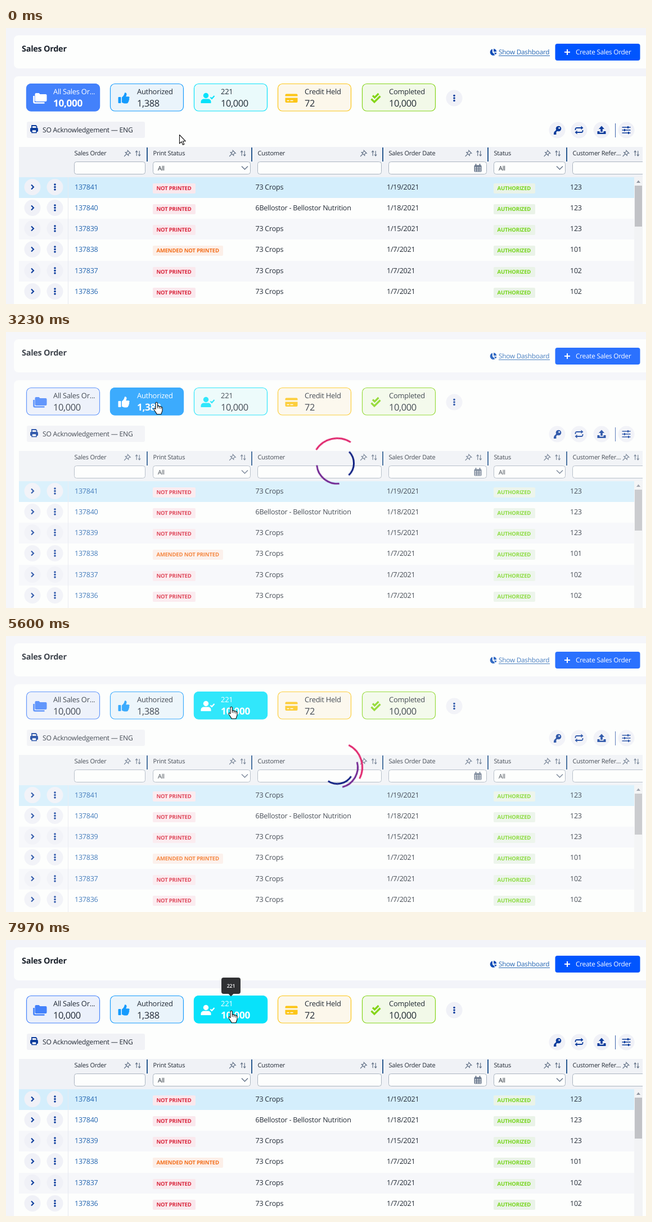
Animation, 1138 px wide and 492 px high, one loop 8 s. Source, as an HTML page:

```html
<!DOCTYPE html>
<html lang="en">
<head>
<meta charset="utf-8">
<title>Sales Order</title>
<style>
html, body { margin: 0; width: 100%; height: 100%; overflow: hidden; background: #f3f4f9; }
svg { display: block; width: 100%; height: 100%; }
text { font-family: "Open Sans", "Noto Sans", sans-serif; letter-spacing: -.02em; text-rendering: geometricPrecision; white-space: pre; }

.hard { animation: 8s step-end infinite; }
.soft { animation: 8s linear infinite; }
.spin { animation: spin 8s linear infinite; }

/* selected tile */
.on0 { animation-name: on0; }
.on1 { animation-name: on1; }
.on2 { animation-name: on2; }
@keyframes on0 { 0% { opacity: 1 } 16.25%, 100% { opacity: 0 } }
@keyframes on1 { 0% { opacity: 0 } 16.25% { opacity: 1 } 65%, 100% { opacity: 0 } }
@keyframes on2 { 0% { opacity: 0 } 65%, 100% { opacity: 1 } }

/* status filter */
.any { animation-name: any; }
.auth { animation-name: auth; }
@keyframes any { 0% { opacity: 1 } 42.5% { opacity: 0 } 65.8%, 100% { opacity: 1 } }
@keyframes auth { 0% { opacity: 0 } 42.5% { opacity: 1 } 65.8%, 100% { opacity: 0 } }

/* loading veil and rings; --v is degrees per second */
.load { animation-name: load; }
@keyframes load {
  0%, 16.25% { opacity: 0 } 19.5%, 43% { opacity: 1 } 46.4%, 65% { opacity: 0 }
  68.25%, 96% { opacity: 1 } 99.4%, 100% { opacity: 0 }
}
@keyframes spin {
  0%, 16.25% { transform: rotate(0deg) }
  50% { transform: rotate(calc(var(--v) * 2.7deg)) }
  50.01%, 65% { transform: rotate(0deg) }
  100% { transform: rotate(calc(var(--v) * 2.8deg)) }
}

.tip1 { animation-name: tip1; }
.tip2 { animation-name: tip2; }
@keyframes tip1 {
  0%, 9.5% { opacity: 0 } 11.5%, 16.25% { opacity: 1 } 17.5%, 45% { opacity: 0 }
  46.5%, 50% { opacity: 1 } 51.5%, 100% { opacity: 0 }
}
@keyframes tip2 {
  0%, 59.5% { opacity: 0 } 61.5%, 65% { opacity: 1 } 66%, 97% { opacity: 0 } 99.4%, 100% { opacity: 1 }
}

.move { animation-name: move; }
.arrow { animation-name: arrow; }
.hand { animation-name: hand; }
@keyframes move {
  0%, 3.75% { transform: translate(308px, 190px); animation-timing-function: ease-in-out }
  12.5%, 47.9% { transform: translate(268px, 126px) }
  50% { transform: translate(279px, 149px) }
  52.5% { transform: translate(300px, 173px) }
  55% { transform: translate(334px, 178px) }
  57.9% { transform: translate(379px, 159px) }
  59% { transform: translate(390px, 146px) }
  61% { transform: translate(399px, 132px) }
  63%, 100% { transform: translate(401px, 127px) }
}
@keyframes arrow { 0% { opacity: 1 } 9.2% { opacity: 0 } 50% { opacity: 1 } 58.9%, 100% { opacity: 0 } }
@keyframes hand { 0% { opacity: 0 } 9.2% { opacity: 1 } 50% { opacity: 0 } 58.9%, 100% { opacity: 1 } }
</style>
</head>
<body>
<svg id="stage" viewBox="0 0 1138 492" xmlns="http://www.w3.org/2000/svg"></svg>
<script>
const NAVY = '#0c3c9c', INK = '#222a35', GREY = '#66758a', SOFT = '#f0f1f7', PANEL = '#fdfefd';

const text = (x, y, s, size, fill = INK, weight = 400, more = '') =>
  `<text x="${x}" y="${y}" font-size="${size}" fill="${fill}" font-weight="${weight}" ${more}>${s}</text>`;
const rect = (x, y, w, h, fill, r = 0, more = '') =>
  `<rect x="${x}" y="${y}" width="${w}" height="${h}" rx="${r}" fill="${fill}" ${more}/>`;
const disc = (x, y, r, fill) => `<circle cx="${x}" cy="${y}" r="${r}" fill="${fill}"/>`;
const line = (d, color, width = 1, more = '') =>
  `<path d="${d}" fill="none" stroke="${color}" stroke-width="${width}" ${more}/>`;
const shape = (d, fill) => `<path d="${d}" fill="${fill}"/>`;
const at = (x, y, s) => `<g transform="translate(${x} ${y})">${s}</g>`;
const group = (cls, s) => `<g class="${cls}">${s}</g>`;
const dots = (x, y) => disc(x, y, 14.5, SOFT) + [-4.5, 0, 4.5].map(d => disc(x, y + d, 1.8, NAVY)).join('');
const round = 'stroke-linecap="round" stroke-linejoin="round"';

// Tile icons, centred on 0,0
const icons = [
  c => shape('M-7-9h5l2 2h10a2 2 0 0 1 2 2V4a2 2 0 0 1-2 2H-7a2 2 0 0 1-2-2V-7a2 2 0 0 1 2-2Z', c) +
    line('M-11-4V6.5a2 2 0 0 0 2 2H8', c, 2.6),
  c => rect(-10, -2, 5, 11, c, 1) +
    shape('M-3.5-1.5C-1-3.5 1-6 1.2-8.5c.2-1.8 3.8-1.6 3.8 1.5 0 1.7-.8 3-1.2 4.3H8c2.5 0 2.7 2.6 1.2 3.5 1 1 .7 2.5-.4 3.1.6 1.2 0 2.4-1 2.8C8 8.5 6.5 9.5 4.5 9.5H1.5C-.5 9.5-2 8.5-3.5 7.8Z', c),
  c => disc(-3, -4.5, 4.7, c) + shape('M-12 9V6.5C-12 3-9 1.5-7 1.5H1C3 1.5 6 3 6 6.5V9Z', c) +
    line('M5-1.5 7.5 1 12-4', c, 2.2),
  c => shape('M-9-7.5H9a2 2 0 0 1 2 2V-3.5H-11V-5.5a2 2 0 0 1 2-2Z', c) +
    shape('M-11-.5H11V6a2 2 0 0 1-2 2H-9a2 2 0 0 1-2-2Z', c) + line('M-8 4.5h4M-2 4.5h5', '#fff', 1.5),
  c => line('M-5.5-4.5-2-1 5-8M-8 1.5-2.5 7 8-3.5', c, 3.2)
];

const tiles = [
  ['All Sales Or...', '10,000', '#4381fb', '#ebf0fb'],
  ['Authorized', '1,388', '#159bfd', '#eaf4fb'],
  ['221', '10,000', '#08e2fa', '#eafafb'],
  ['Credit Held', '72', '#fcc516', '#fcf7eb'],
  ['Completed', '10,000', '#84d518', '#f2f9e8']
];

function tile([label, value, color, tint], i) {
  const x = Math.floor(36 + i * 149.25) + .5;
  const face = (fill, ink, mark, weight, size) =>
    rect(x, 99.5, 130, 48.5, fill, 8, `stroke="${color}" stroke-width="1.2"`) +
    at(x + 24, 125, icons[i](mark)) +
    text(x + 47.5, 117.5, label, 12.95, ink) + text(x + 47.5, 139.5, value, size, ink, weight);
  const active = i < 3 ? group(`hard on${i}`, face(color, '#fff', '#fff', 700, 17.2)) : '';
  return face(tint, INK, color, 400, 16.4) + active;
}

function header() {
  return rect(14, 13, 1140, 59, PANEL, 8) +
    text(28, 42, 'Sales Order', 14.5, '#1b222c', 700) +
    at(866, 43, shape('M-1-5.5A5.8 5.8 0 1 0 3.6 5L-1 .5Z', '#0d4fb8') +
      shape('M1-6A5.5 5.5 0 0 1 6.3-.7H1Z', '#0d4fb8') + shape('M1.5 1H6.3A5.5 5.5 0 0 1 4.8 4.4Z', '#0d4fb8')) +
    text(876, 47, 'Show Dashboard', 11.8, '#2566b4') + line('M876 49.5H967', '#2566b4') +
    rect(976.5, 28, 151, 30, '#0055fe', 4) +
    line('M993 43H1003M998 38V48', '#fff', 2) +
    text(1013, 47.2, 'Create Sales Order', 11.8, '#fff');
}

function toolbar() {
  const circles = [980, 1019, 1059, 1103].map(x => disc(x, 182, 14.5, SOFT)).join('');
  return rect(37, 167, 210, 29, '#f1f2f6', 3) +
    at(50, 180, rect(-7, -2, 14, 7, NAVY, 1.5) + line('M-4-2V-6H3L4.5-4.5V-2', NAVY, 1.8) +
      rect(-4, 1.5, 8, 5, '#fff', 0, `stroke="${NAVY}" stroke-width="1.6"`)) +
    text(65, 185.5, 'SO Acknowledgement — ENG', 12.1) + circles +
    at(980, 182, disc(2.5, -2.5, 4.8, NAVY) + disc(3.7, -3.7, 1.4, '#fff') +
      line('M.5-.5-5 5M-6 6.5H-3V4', NAVY, 2.8)) +
    at(1019, 182, line('M-6.5 0V-1.5A2.5 2.5 0 0 1-4-4H5M6.5 0V1.5A2.5 2.5 0 0 1 4 4H-5', NAVY, 1.8) +
      shape('M3.5-7.5 7.5-4 3.5-.8ZM-3.5 7.5-7.5 4-3.5.8Z', NAVY)) +
    at(1059, 182, shape('M0-7.5 5-2H1.8V3H-1.8V-2H-5Z', NAVY) +
      shape('M-7.5 2H-3.5V4.5H3.5V2H7.5V7H-7.5Z', NAVY)) +
    line('M1083.5 170V195', '#3b62ac') +
    at(1103, 182, line('M-7.5-5H7.5M-7.5 0H7.5M-7.5 5H7.5', NAVY, 1.7) +
      line('M3-7V-3M-3-2V2M4 3V7', NAVY, 2));
}

const columns = [
  ['Sales Order', 121.5, 247.5, 216], ['Print Status', 261.5, 434.5, 403], ['Customer', 447.5, 667.5, 636],
  ['Sales Order Date', 680.5, 854.5, 822.5], ['Status', 867.5, 994.5, 962.5], ['Customer Refer...', 1007.5, 1140, 1102.5]
];

function column([label, left, right, pin], i) {
  const chevron = line(`M${right - 15.5} 246.5l5.5 5.5 5.5-5.5`, GREY, 1.5);
  let extra = '';
  if (i === 1) extra = text(270, 253.5, 'All', 11) + chevron;
  if (i === 3) extra = at(839, 250, rect(-6.5, -5.5, 13, 12, GREY, 1.5) + line('M-3.5-8V-4M3.5-8V-4', GREY, 1.8) +
    line('M-5-1.5H5M-5 1.5H5M-5 4.5H5', '#fff', 1.4, 'stroke-dasharray="2.2 1.7"'));
  if (i === 4) extra = chevron + group('hard any', text(876, 253.5, 'All', 11)) +
    group('hard auth', text(876, 253.5, 'Authorized', 11) + line('M961.5 246l7 7m0-7-7 7', GREY, 1.6));
  return (i ? line(`M${left - 10.5} 213V238`, '#2a5a90', 2) : '') +
    text(left, 227, label, 11) +
    at(pin, 223, line('M-5.5 5.5-1.5 1.5M-4-1.5 2 4.5M-3-.8C-1-1.2 0-2 1-4M1.3 3.6C1.7 1.5 2.5.5 4.5-.5M0-5 5.5.5', GREY, 1.2, round)) +
    at(pin + 18.7, 223.5, line('M-2.5 4.5V-4M-4.5-2-2.5-4.5-.5-2M2.5-4.5V4M.5 2 2.5 4.5 4.5 2', GREY, 1.2)) +
    rect(left, 238.5, right - left, 22, PANEL, 4, 'stroke="#aab4c0"') + extra;
}

const CROPS = '73 Crops';
const orders = [
  [CROPS, '1/19/2021', 123], ['6Bellostor - Bellostor Nutrition', '1/18/2021', 123], [CROPS, '1/15/2021', 123],
  [CROPS, '1/7/2021', 101], [CROPS, '1/7/2021', 102], [CROPS, '1/7/2021', 102]
];

function row([customer, date, ref], i) {
  const top = Math.round(265.5 + i * 37.25), mid = top + 17.5, base = top + 22;
  const fill = i === 0 ? '#d4eefc' : i % 2 ? PANEL : '#f6f7fa';
  const badge = (x, w, s, color, tint) =>
    rect(x, top + 11, w, 18, tint, 2) + text(x + 6.5, top + 23, s, 9.55, color, 700);
  return rect(23, top, 1094, 38, fill) +
    disc(47, mid, 14.5, SOFT) + line(`M45 ${mid - 4}l4 4-4 4`, NAVY, 2.1) + dots(87, mid) +
    text(122, base, 137841 - i, 12.55, '#2265b0') +
    (i === 3 ? badge(261, 125, 'AMENDED NOT PRINTED', '#f3701d', '#fcefe8')
             : badge(261, 76, 'NOT PRINTED', '#d9263c', '#fae8ed')) +
    text(443.5, base, customer, 12.55) + text(677, base, date, 12.6) +
    badge(867, 74, 'AUTHORIZED', '#76d51c', '#eaf3e8') + text(1003, base, ref, 12.5);
}

function grid() {
  return `<clipPath id="edge"><rect x="23" y="212" width="1109" height="280"/></clipPath><g clip-path="url(#edge)">` +
    rect(23, 212, 1109, 54, '#f0f2f6') + columns.map(column).join('') + orders.map(row).join('') +
    rect(23, 489, 1094, 3, PANEL) + line('M110.5 266V492', '#e6e9f0') +
    rect(1117, 266, 15, 226, '#f2f3f5') + rect(1118, 281, 13, 73, '#c1c2c6') +
    shape('M1121 276 1124.5 271.5 1128 276Z', '#8f959f') + '</g>';
}

const ring = (r, speed, color) => {
  const k = r * Math.SQRT1_2;
  return `<path class="spin" style="--v:${speed}" d="M${-k} ${-k}A${r} ${r} 0 0 1 ${k} ${-k}" fill="none" stroke="${color}" stroke-width="3"/>`;
};

const tip = (cls, x, w, s) => group(`soft ${cls}`,
  rect(x - w / 2, 67, w, 29, '#303133', 4) + shape(`M${x - 5} 95.5h10l-5 5Z`, '#303133') +
  text(x, 85, s, 8.9, '#fff', 600, 'text-anchor="middle"'));

const loader = group('soft load', rect(0, 0, 1138, 492, '#fff', 0, 'opacity=".17"') +
  at(589, 234, ring(44.5, 180, '#e0286e') + ring(36.5, 300, '#702591') + ring(29.5, 420, '#0c1d80')));

const outline = 'fill="#fff" stroke="#111" stroke-width="1.1" stroke-linejoin="round"';
const cursor = group('soft move',
  group('hard arrow', `<path d="M.5.5V16L4 12.7 6.5 18.3 8.8 17.3 6.4 11.7H11.2Z" ${outline}/>`) +
  group('hard hand', `<path d="M-2 11.5V1a1.7 1.7 0 0 1 3.4 0V6.5c.6-1 2.9-.8 3.1.6.8-.9 2.8-.6 3 .8 1-.7 2.5 0 2.5 1.5V14c0 2-1.8 3.5-2 6.5H0c-.3-2.5-3-4.5-5-8.5-.8-1.8 1.3-2.8 3-.5Z" ${outline}/>` +
    line('M1.4 6.5V10M4.5 7.5V10.5M7.5 8.5V11', '#111')));

document.getElementById('stage').innerHTML =
  rect(0, 0, 1138, 492, '#f3f4f9') + header() + rect(14, 86, 1140, 420, PANEL, 8) +
  tiles.map(tile).join('') + dots(797, 125) + toolbar() + grid() +
  tip('tip1', 251, 64, 'Authorized') + tip('tip2', 400, 34, '221') + loader + cursor;
</script>
</body>
</html>
```
